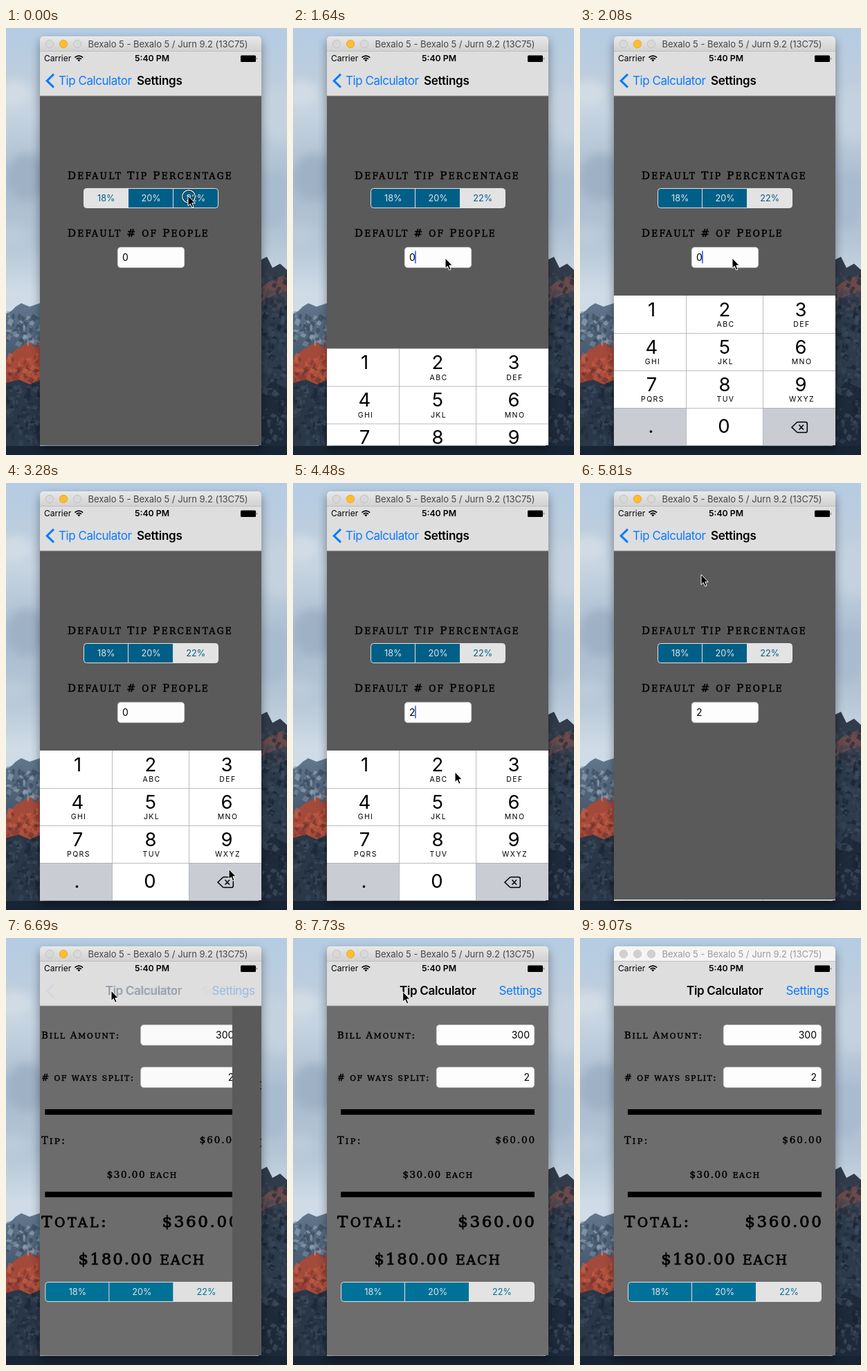
An HTML page for the animation above (9170 ms loop, 406x616 px).

```html
<!DOCTYPE html>
<html lang="en">
<head>
<meta charset="utf-8">
<title>Tip Calculator settings</title>
<style>
html, body { margin: 0; width: 100%; height: 100%; overflow: hidden; background: #b9cade; }
svg { display: block; width: 406px; height: 616px; font-family: Inter, Roboto, sans-serif; }
text { white-space: pre; }
.plate { font-family: "DejaVu Serif", serif; stroke: #000; stroke-width: .035em; }
.nav { font-size: 17px; letter-spacing: -.45px; }
.bold { font-weight: 600; }
.nav.bold { letter-spacing: -.3px; }
.blue { fill: #0a7aff; }
.mid { text-anchor: middle; }
.end { text-anchor: end; }
</style>
</head>
<body>
<svg viewBox="0 0 406 616" xmlns="http://www.w3.org/2000/svg">
  <defs>
    <linearGradient id="sky" x2="0" y2="1">
      <stop offset="0" stop-color="#b4cce3"/>
      <stop offset=".12" stop-color="#bdcddd"/>
      <stop offset=".2" stop-color="#c6d4e1"/>
      <stop offset=".36" stop-color="#a9bccf"/>
      <stop offset=".5" stop-color="#b4c5d5"/>
      <stop offset=".62" stop-color="#cfdce7"/>
    </linearGradient>
    <linearGradient id="rock" x2="0" y2="1">
      <stop offset="0" stop-color="#62778d"/>
      <stop offset="1" stop-color="#3d4e62"/>
    </linearGradient>
    <linearGradient id="chrome" x2="0" y2="1">
      <stop offset="0" stop-color="#e9e8e9"/>
      <stop offset="1" stop-color="#d2d1d2"/>
    </linearGradient>
    <filter id="soft" x="-50%" y="-50%" width="200%" height="200%"><feGaussianBlur stdDeviation="7"/></filter>
    <clipPath id="window"><path d="M49 602V17a5 5 0 0 1 5-5H364a5 5 0 0 1 5 5V602Z"/></clipPath>
    <clipPath id="body"><rect x="49" y="98" width="320" height="504"/></clipPath>
  </defs>

  <rect width="406" height="616" fill="url(#sky)"/>
  <g filter="url(#soft)">
    <ellipse cx="12" cy="95" rx="26" ry="20" fill="#d0dbe5"/>
    <ellipse cx="30" cy="215" rx="30" ry="34" fill="#9fb1c5"/>
    <ellipse cx="10" cy="300" rx="24" ry="16" fill="#bccbd9"/>
    <ellipse cx="396" cy="125" rx="22" ry="40" fill="#c4d1de"/>
    <ellipse cx="385" cy="250" rx="22" ry="40" fill="#a8bbcf"/>
  </g>
  <path d="M0 412L8 408L14 402L22 397L34 402L49 397V500H0Z" fill="url(#rock)"/>
  <path d="M0 478L14 464L30 455L49 446V520H0Z" fill="#a34a3b"/>
  <path d="M0 512L18 507L34 514L49 508V616H0Z" fill="#2a3747"/>
  <path d="M365 336L377 330L385 346L396 340L406 349V616H365Z" fill="#313b4a"/>
  <path d="M365 378L380 366L392 360L406 356V380L386 386L365 396Z" fill="#6a4a4b"/>
  <path d="M365 400L382 392L394 396L406 388V616H365Z" fill="#2c3a4b"/>
  <path d="M365 530L384 510L406 520V616H365Z" fill="#1e2a39"/>
  <g id="crags"></g>
  <rect y="603" width="406" height="13" fill="#172433"/>

  <rect x="49" y="18" width="320" height="590" rx="5" fill="#000" opacity=".4" filter="url(#soft)"/>
  <g clip-path="url(#window)">
    <rect x="49" y="12" width="320" height="22" fill="url(#chrome)" id="titlebar"/>
    <g id="lights" stroke-width=".8">
      <circle cx="63" cy="23" r="5.7"/><circle cx="83" cy="23" r="5.7"/><circle cx="103" cy="23" r="5.7"/>
    </g>
    <text id="caption" class="mid" x="234" y="28" font-size="13" letter-spacing="-.03">Bexalo 5 - Bexalo 5 / Jurn 9.2 (13C75)</text>

    <g clip-path="url(#body)">
      <g id="main"></g>
      <rect id="dim" x="49" y="98" width="320" height="504"/>
      <g id="settings"></g>
      <g id="keyboard"></g>
    </g>

    <rect x="49" y="33.5" width="320" height="64.5" fill="#dedede"/>
    <path d="M49 33.5H369" stroke="#b4b4b4" stroke-width=".7"/>
    <path d="M49 98H369" stroke="#8e8e8e" stroke-width=".8"/>
    <text x="55" y="48.3" font-size="12">Carrier</text>
    <g fill="none" stroke="#000" stroke-width="1.6">
      <path d="M99.4 42.6Q105.3 37.6 111.2 42.6M101.6 44.9Q105.3 41.8 109 44.9"/>
      <path d="M103.2 46L105.3 48.4L107.4 46Q105.3 44.6 103.2 46Z" fill="#000" stroke="none"/>
    </g>
    <text class="mid bold" x="211" y="48.3" font-size="12.3">5:40 PM</text>
    <rect x="339" y="39.5" width="22" height="9.6" rx="1.5"/>
    <path d="M362 42.5q1.6 1.8 0 3.6z"/>
    <path id="chevron" d="M69 66.7L59.2 76.2L69 85.7" fill="none" stroke="#0a7aff" stroke-width="3"/>
    <text id="back" class="nav blue" x="76" y="82">Tip Calculator</text>
    <text id="oldTitle" class="nav bold" x="189" y="82">Settings</text>
    <text id="newTitle" class="nav bold" x="154" y="82">Tip Calculator</text>
    <text id="button" class="nav blue" x="297.5" y="82">Settings</text>
  </g>

  <g id="pointer">
    <g id="ring" fill="none">
      <circle cx="1" cy="1" r="9" stroke="#111" stroke-width="2.5"/>
      <circle cx="1" cy="1" r="9.2" stroke="#fff" stroke-width="1.2"/>
    </g>
    <path d="M0 0V14.6L3.3 11.6L5.7 17.2L8.1 16.2L5.8 10.7H10.3Z" stroke="#fff" stroke-width="1"/>
  </g>
</svg>
<script>
const LOOP = 9170, TICK = 148.8;
const $ = id => document.getElementById(id);
const show = (id, on) => $(id).setAttribute('visibility', on ? 'visible' : 'hidden');
const fade = (id, a) => $(id).setAttribute('opacity', Math.max(0, Math.min(1, a)));
const move = (id, x, y = 0) => $(id).setAttribute('transform', `translate(${x} ${y})`);

// Rock and foliage texture: small seeded shards
let seed = 7;
const rand = () => (seed = seed * 16807 % 2147483647) / 2147483647;
function shards(x, y, w, h, count, tones) {
  let out = '';
  for (let i = 0; i < count; i++) {
    const px = x + rand() * w, py = y + rand() * h;
    const dx = 2 + rand() * 5, dy = 2 + rand() * 7;
    const tone = tones[Math.floor(rand() * tones.length)];
    out += `<path d="M${px} ${py}l${dx} ${dy * .4}l${-dx * .5} ${dy}l${-dx} ${-dy * .5}z" fill="${tone}" opacity=".7"/>`;
  }
  return out;
}
$('crags').innerHTML =
  shards(2, 408, 46, 44, 60, ['#8fa2b4', '#45586d', '#3a4b5f', '#71869b']) +
  shards(2, 468, 46, 36, 60, ['#c05f49', '#8a3b30', '#6f352f', '#b4523f']) +
  shards(0, 512, 48, 84, 90, ['#1a2635', '#3f4e60', '#212e3e', '#354658']) +
  shards(368, 350, 38, 50, 40, ['#232c39', '#4a4650', '#3d4857']) +
  shards(368, 395, 38, 200, 150, ['#18232f', '#3e4d60', '#222f3e', '#334355']);

// Engraved lettering: lower case becomes smaller capitals.
function plate(str, x, y, size, gap, cls = '') {
  const runs = str.replace(/[a-z]+/g, s => `<tspan font-size="${size * .82}">${s.toUpperCase()}</tspan>`);
  return `<text class="plate ${cls}" x="${x}" y="${y}" font-size="${size}" letter-spacing="${gap}">${runs}</text>`;
}

const box = (x, y, w, h, fill, rx = 0) =>
  `<rect x="${x}" y="${y}" width="${w}" height="${h}" rx="${rx}" fill="${fill}"/>`;
const field = (x, y, w) =>
  `<rect x="${x + .3}" y="${y + .3}" width="${w - .6}" height="29.4" rx="4.5" fill="#fdfdfd" stroke="#ccc" stroke-width=".6"/>`;

function segments(x, y, w, color, picked) {
  const h = 28, s = w / 3, pale = '#e3e3e3';
  const edge = i => i % 3 ? Math.floor(x + s * i - .8) + .5 : x + s * i;
  const px = edge(picked), pw = edge(picked + 1) - px;
  const left = picked === 0 ? 4 : 0, right = picked === 2 ? 4 : 0;
  let out = box(x, y, w, h, color, 4) +
    `<path d="M${px + left} ${y}h${pw - left - right}q${right} 0 ${right} ${right}v${h - 2 * right}q0 ${right} ${-right} ${right}` +
    `h${left + right - pw}q${-left} 0 ${-left} ${-left}v${2 * left - h}q0 ${-left} ${left} ${-left}z" fill="${pale}"/>` +
    `<rect x="${x}" y="${y}" width="${w}" height="${h}" rx="4" fill="none" stroke="${pale}"/>` +
    `<path d="M${edge(1)} ${y}v${h}M${edge(2)} ${y}v${h}" stroke="${pale}"/>`;
  ['18%', '20%', '22%'].forEach((label, i) => {
    out += `<text class="mid" x="${x + s * (i + .5)}" y="${y + 18.7}" font-size="12.7" fill="${i === picked ? color : pale}">${label}</text>`;
  });
  return out;
}

$('main').innerHTML =
  box(49, 98, 320, 504, '#6d6d6d') +
  plate('Bill Amount:', 64, 145, 13, 1.9) + field(207, 125, 142) +
  plate('# of ways split:', 64, 206, 13, 1.6) + field(207, 186, 142) +
  '<text class="end" x="342" y="145" font-size="14">300</text>' +
  '<text class="end" x="342" y="206" font-size="14">2</text>' +
  box(69, 247, 280, 8, '#000') + box(69, 366, 280, 8, '#000') +
  plate('Tip:', 64, 297, 14, 2.4) +
  plate('$60.00', 351, 296, 13.5, 1.9, 'end') +
  plate('$30.00 each', 209.5, 346, 13.5, 1.5, 'mid') +
  plate('Total:', 64, 417, 23, 3.4) +
  plate('$360.00', 351.5, 417, 23, 2.6, 'end') +
  plate('$180.00 each', 209, 471, 23, 1.9, 'mid') +
  segments(69.5, 496.5, 279, '#007299', 2);

$('settings').innerHTML =
  box(49, 98, 320, 504, '#5a5a5a') +
  plate('Default Tip Percentage', 89, 218.3, 15, 2.3) +
  `<g id="tip18">${segments(112.5, 231.5, 194, '#005f87', 0)}</g>` +
  `<g id="tip22">${segments(112.5, 231.5, 194, '#005f87', 2)}</g>` +
  plate('Default # of People', 89, 301.3, 15, 2.2) +
  field(161, 316, 97) +
  '<text id="people" x="168" y="336" font-size="14"></text>' +
  '<rect id="caret" y="321.5" width="1.8" height="18" fill="#426bf2"/>';

const centers = [103.5, 209, 319];
const letters = ['', 'ABC', 'DEF', 'GHI', 'JKL', 'MNO', 'PQRS', 'TUV', 'WXYZ'];
let keys = box(49, 386, 320, 216, '#fff') +
  box(49, 548, 104.5, 54, '#c9ccd3') +
  '<rect id="erase" x="264.5" y="548" width="104.5" height="54"/>' +
  '<rect id="two" x="153.5" y="386" width="111" height="54" fill="#c9ccd3"/>';
['1', '2', '3', '4', '5', '6', '7', '8', '9', '.', '0'].forEach((label, i) => {
  const x = centers[i % 3] - (i > 8 ? 1 : 0);
  const y = 386 + 54 * Math.floor(i / 3);
  keys += `<text class="mid" x="${x}" y="${y + (i < 9 ? 29.8 : 36.2)}" font-size="27.5">${label}</text>`;
  if (letters[i]) keys += `<text class="mid" x="${x + 1.5}" y="${y + 45.2}" font-size="10.5" letter-spacing="1.4">${letters[i]}</text>`;
});
keys += '<path d="M153.5 386V602M264.5 386V602M49 440.5H369M49 494.5H369M49 548.5H369" stroke="#a9abb0" stroke-width=".8"/>' +
  '<path d="M306 576L313 569.3Q313.8 568.6 315 568.6H326Q328.3 568.6 328.3 571V581.2Q328.3 583.6 326 583.6H315Q313.8 583.6 313 582.8Z' +
  'M316.5 572.6L323 579.4M323 572.6L316.5 579.4" fill="none" stroke="#000" stroke-width="1.5"/>';
$('keyboard').innerHTML = keys;

// Pointer stops: tick, x, y
const stops = [
  [0, 263, 242], [1, 263, 242], [4, 240, 312], [6, 213, 357], [7, 210, 346], [8, 220, 332],
  [16, 220, 332], [22, 322, 557], [23, 322, 557], [28, 234, 417], [31, 234, 417],
  [35, 175, 132], [39, 175, 132], [42, 152, 76], [50, 152, 76], [53, 161, 78], [62, 161, 78]
];
function pointerAt(n) {
  const i = stops.findIndex(s => s[0] > n);
  const [a, b] = [stops[i - 1], stops[i]];
  const u = (n - a[0]) / (b[0] - a[0]), e = u * u * (3 - 2 * u);
  return [a[1] + (b[1] - a[1]) * e, a[2] + (b[2] - a[2]) * e];
}

// Critically damped spring, 0 to 1
function spring(n, start) {
  const w = 2.53 * Math.max(0, n - start);
  const p = 1 - (1 + w) * Math.exp(-w);
  return p > .998 ? 1 : p;
}

function chrome(active) {
  $('titlebar').setAttribute('fill', active ? 'url(#chrome)' : '#f5f5f5');
  $('caption').setAttribute('fill', active ? '#454545' : '#9a9a9a');
  [...$('lights').children].forEach((c, i) => {
    const lit = active && i === 1;
    c.setAttribute('fill', lit ? '#fdbd2e' : active ? '#d9d8d9' : '#d0d0d0');
    c.setAttribute('stroke', lit ? '#e0a02a' : active ? '#bcbbbc' : '#c6c6c6');
  });
}

function draw(ms) {
  const n = Math.min(61, Math.floor((ms + 10) / TICK));
  const up = spring(n, 10.13) - spring(n, 36);
  const p = spring(n, 43.6);

  show('tip18', n < 1);
  show('tip22', n >= 1);
  $('people').textContent = n < 23 ? '0' : n < 29 ? '' : '2';
  const edited = n >= 29 ? 29 : n >= 23 ? 23 : 10;
  show('caret', n >= 10 && n < 36 && (n - edited) % 7 < 5);
  $('caret').setAttribute('x', n >= 23 && n < 29 ? 168 : 176);

  move('keyboard', 0, 216 * (1 - up));
  show('keyboard', up > 0);
  fade('two', n === 29 ? 1 : 0);
  $('erase').setAttribute('fill', n === 23 ? '#fff' : '#c9ccd3');

  move('main', -96 * (1 - p));
  fade('dim', .1 * (1 - p));
  move('settings', 320 * p);
  fade('chevron', (1 - p) ** 1.4);
  fade('back', n === 43 ? .3 : 1 - p);
  move('back', 78 * p);
  fade('oldTitle', (1 - p) ** 2);
  move('oldTitle', 108 * p);
  fade('newTitle', p ** 10);
  move('newTitle', -78 * (1 - p));
  fade('button', p ** 8);

  chrome(n < 61);
  move('pointer', ...pointerAt(n));
  show('pointer', n < 61);
  fade('ring', [0, 10, 23, 29, 36, 43].includes(n) ? 1 : 0);
}

const began = performance.now();
function loop() {
  draw((performance.now() - began) % LOOP);
  requestAnimationFrame(loop);
}
loop();
</script>
</body>
</html>
```
